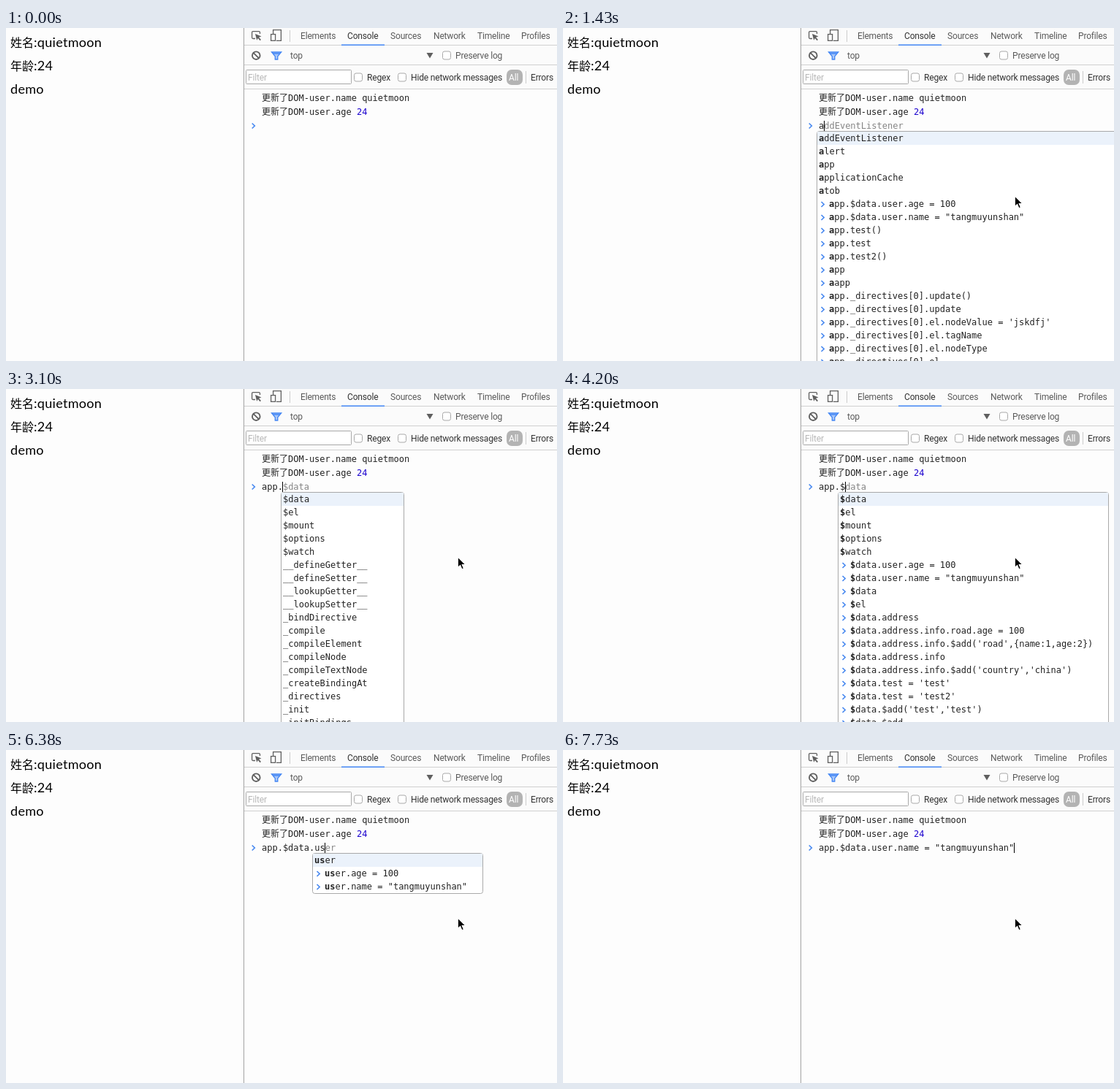
These frames come from a looping animation (754x456 px, 8000 ms). An HTML page:

```html
<!DOCTYPE html>
<html lang="zh-CN">
<head>
<meta charset="utf-8">
<title>Console typing</title>
<style>
html, body { margin: 0; width: 100%; height: 100%; overflow: hidden; background: #fff; }
svg { display: block; }
text { white-space: pre; }
.page { font: 18px Lato, "Noto Sans CJK SC", "Noto Sans CJK", sans-serif; letter-spacing: .3px; }
.page .han { font-size: 16px; letter-spacing: 0; }
.ui { font: 12px Roboto, "Liberation Sans", sans-serif; letter-spacing: -.17px; fill: #5a5a5a; }
.ui .dark { fill: #333; }
.mono { font: 12px "DejaVu Sans Mono", "Noto Sans CJK SC", "Noto Sans CJK", monospace; fill: #222; }
.box { fill: #fff; stroke: #a9a9a9; }
.chevron { fill: none; stroke: #4a8af0; stroke-width: 1.7; }
.icon { fill: none; stroke: #5f5f5f; stroke-width: 1.3; }
</style>
</head>
<body>
<svg id="stage" width="754" height="456" viewBox="0 0 754 456">
  <rect width="754" height="456" fill="#fdfdfd"/>
  <g class="page">
    <text x="6" y="26"><tspan class="han">姓名</tspan>:quietmoon</text>
    <text x="6" y="58"><tspan class="han">年龄</tspan>:24</text>
    <text x="6" y="90">demo</text>
  </g>

  <rect x="326" width="428" height="83" fill="#fbfbfb"/>
  <path d="M326 23.5H754M326 50.5H754M326 83.5H754" stroke="#d0d0d0"/>
  <path d="M325.5 0V456" stroke="#a3a3a3"/>
  <rect x="459" y="22.5" width="59" height="1.5" fill="#4285f4"/>
  <path d="M388.5 3V19M711.5 59V76" stroke="#ccc"/>

  <g class="icon">
    <path d="M341 14.5H338Q336.6 14.5 336.6 13V6Q336.6 4.6 338 4.6H346Q347.5 4.6 347.5 6V8"/>
    <path d="M341 8L349.5 11.5L346 12.8L349 16L347.6 17.2L344.8 14L343.2 16.8Z" fill="#5f5f5f" stroke="none"/>
    <path d="M365.6 8V2.7H376.4V17.3H370"/>
    <rect x="362.6" y="8.6" width="6" height="8.7"/>
    <circle cx="342.3" cy="37.7" r="5.3" stroke-width="1.9"/>
    <path d="M338.7 34.1L346 41.4" stroke-width="1.9"/>
    <path d="M363.5 33H376.7L371.8 38.8V43H368.3V38.8ZM365 35H375" stroke="#4285f4" fill="#a9c8f8"/>
  </g>
  <path d="M575.5 34H584.5L580 41.5Z" fill="#5f5f5f"/>

  <g class="box">
    <rect x="328.5" y="57.5" width="144" height="19" rx="1"/>
    <rect x="597.5" y="32" width="11" height="11" rx="2.5"/>
    <rect x="476.5" y="62" width="11" height="11" rx="2.5"/>
    <rect x="536.5" y="62" width="11" height="11" rx="2.5"/>
  </g>
  <rect x="685" y="57" width="22" height="21" rx="7" fill="#b3b3b3"/>
  <g class="ui">
    <text x="403" y="15">Elements</text>
    <text class="dark" x="467" y="15">Console</text>
    <text x="526" y="15">Sources</text>
    <text x="585" y="15">Network</text>
    <text x="645" y="15">Timeline</text>
    <text x="705" y="15">Profiles</text>
    <text x="389" y="42">top</text>
    <text x="615" y="42">Preserve log</text>
    <text x="331" y="72" style="fill:#b8b8b8">Filter</text>
    <text class="dark" x="494" y="72">Regex</text>
    <text class="dark" x="554" y="72">Hide network messages</text>
    <text x="688" y="72" style="fill:#fff">All</text>
    <text class="dark" x="718" y="72">Errors</text>
  </g>

  <g class="mono">
    <text x="350" y="100">更新了DOM-user.name quietmoon</text>
    <text x="350" y="119">更新了DOM-user.age <tspan fill="#1c00cf">24</tspan></text>
    <path class="chevron" d="M336.7 130.5L340.3 134L336.7 137.5"/>
    <g id="prompt"></g>
  </g>
  <path id="mouse" d="M0 0V14.5L3.3 11.4L5.6 16.8L8.1 15.7L5.9 10.5H10.6Z" fill="#000" stroke="#fff" stroke-width="1.1"/>
</svg>
<script>
const LOOP = 8000, LEFT = 350, CHAR = 7.224, ROW = 18;
const prompt = document.getElementById("prompt");
const mouse = document.getElementById("mouse");

const words = s => s.split(" ");
const past = list => list.map(s => "> " + s);
const column = n => Math.round(LEFT + n * CHAR);

const userLines = ['user.age = 100', 'user.name = "tangmuyunshan"'];
const dataLines = userLines.map(s => "$data." + s);
const magic = words("__defineGetter__ __defineSetter__ __lookupGetter__ __lookupSetter__");
const members = words("$data $el $mount $options $watch");

const appLines = dataLines.map(s => "app." + s).concat(words("app.test() app.test app.test2() app"));
const elLines = [
  "update()", "update", "el.nodeValue = 'jskdfj'", "el.tagName", "el.nodeType", "el"
].map(s => "app._directives[0]." + s);
const olderLines = words("app._directives[0] app._directives app.$data app.$el");

const globals = [...words("addEventListener alert app applicationCache atob"),
  ...past([...appLines, "aapp", ...elLines])];
const apps = [...words("app applicationCache"), ...past([...appLines, ...elLines, ...olderLines])];
const appMembers = [...members, ...magic,
  ...words("_bindDirective _compile _compileElement _compileNode _compileTextNode _createBindingAt _directives _init _initBindings")];
const dollar = [...members, ...past([...dataLines, "$data", "$el", "$data.address",
  "$data.address.info.road.age = 100", "$data.address.info.$add('road',{name:1,age:2})",
  "$data.address.info", "$data.address.info.$add('country','china')",
  "$data.test = 'test'", "$data.test = 'test2'", "$data.$add('test','test')", "$data.$add"])];
const dataMembers = [...words("$add $delete $observer"), ...magic,
  ...words("address age constructor hasOwnProperty isPrototypeOf message name propertyIsEnumerable toLocaleString toString user")];
const users = ["user", ...past(userLines)];

// Each step: start time, typed text, then the popup's items, width and selected row.
const steps = [
  { at: 0, typed: "", caret: false },
  { at: 680, typed: "" },
  { at: 1130, typed: "", caret: false },
  { at: 1400, typed: "a" },
  { at: 1430, typed: "a", items: globals, width: 420 },
  { at: 2560, typed: "ap", items: globals, width: 420 },
  { at: 2620, typed: "ap", items: apps, width: 420 },
  { at: 2710, typed: "app", items: apps, width: 420 },
  { at: 3100, typed: "app.", items: appMembers, width: 168 },
  { at: 4200, typed: "app.$", items: dollar, width: 370 },
  { at: 5010, typed: "app.$data" },
  { at: 5370, typed: "app.$data." },
  { at: 5430, typed: "app.$data.", items: dataMembers, width: 169 },
  { at: 6170, typed: "app.$data.u" },
  { at: 6200, typed: "app.$data.u", items: users, width: 233 },
  { at: 6350, typed: "app.$data.us" },
  { at: 6380, typed: "app.$data.us", items: users, width: 233 },
  { at: 7220, typed: "app.$data.us", items: users, width: 233, pick: 1 },
  { at: 7400, typed: "app.$data.us", items: users, width: 233, pick: 2 },
  { at: 7730, typed: "app." + dataLines[1] }
];

function add(parent, tag, attrs, text = "") {
  const node = document.createElementNS("http://www.w3.org/2000/svg", tag);
  for (const key in attrs) node.setAttribute(key, attrs[key]);
  node.textContent = text;
  return parent.appendChild(node);
}

function drawPopup({ items, width, pick = 0 }, start, stem) {
  const x = column(start) - 2.5;
  add(prompt, "rect", { x, y: 141.5, width, height: items.length * ROW + 1, rx: 3, class: "box" });
  add(prompt, "rect", { x: x + .5, y: 142 + pick * ROW, width: width - 1, height: ROW, fill: "#ebf2fb" });
  items.forEach((item, i) => {
    const old = item.startsWith("> "), label = old ? item.slice(2) : item;
    const y = 155 + i * ROW;
    if (old) add(prompt, "path", { class: "chevron", d: `M${x + 6} ${y - 7}l3.6 3.5l-3.6 3.5` });
    const line = add(prompt, "text", { x: x + (old ? 16.5 : 2.5), y });
    const n = label.startsWith(stem) ? stem.length : 1;
    if (stem) add(line, "tspan", { "font-weight": "bold" }, label.slice(0, n));
    add(line, "tspan", {}, stem ? label.slice(n) : label);
  });
}

function drawPrompt(step) {
  prompt.replaceChildren();
  const { typed, items, pick = 0, caret = true } = step;
  const start = typed.lastIndexOf(".") + 1, stem = typed.slice(start);
  const line = add(prompt, "text", { x: LEFT, y: 138 });
  add(line, "tspan", {}, typed);
  if (items) {
    const best = items[pick].replace("> ", "");
    if (best.startsWith(stem)) add(line, "tspan", { fill: "#858585" }, best.slice(stem.length));
    drawPopup(step, start, stem);
  }
  if (caret) {
    add(prompt, "rect", { x: Math.floor(LEFT + typed.length * CHAR), y: 127, width: 1, height: 14, fill: "#000" });
  }
}

function moveMouse(t) {
  const p = Math.min(1, Math.floor((t - 360) / 50) / 3);
  const rest = (1 - p) ** 1.5;
  mouse.setAttribute("visibility", t < 360 ? "hidden" : "visible");
  mouse.setAttribute("transform", `translate(${618.3 + 101 * rest} ${230 + 10 * rest})`);
}

let shown;
function render(t) {
  const step = steps.findLast(s => s.at <= t);
  if (step !== shown) drawPrompt(shown = step);
  moveMouse(t);
}

const begin = performance.now();
function tick() {
  render((performance.now() - begin) % LOOP);
  requestAnimationFrame(tick);
}
tick();
</script>
</body>
</html>
```
